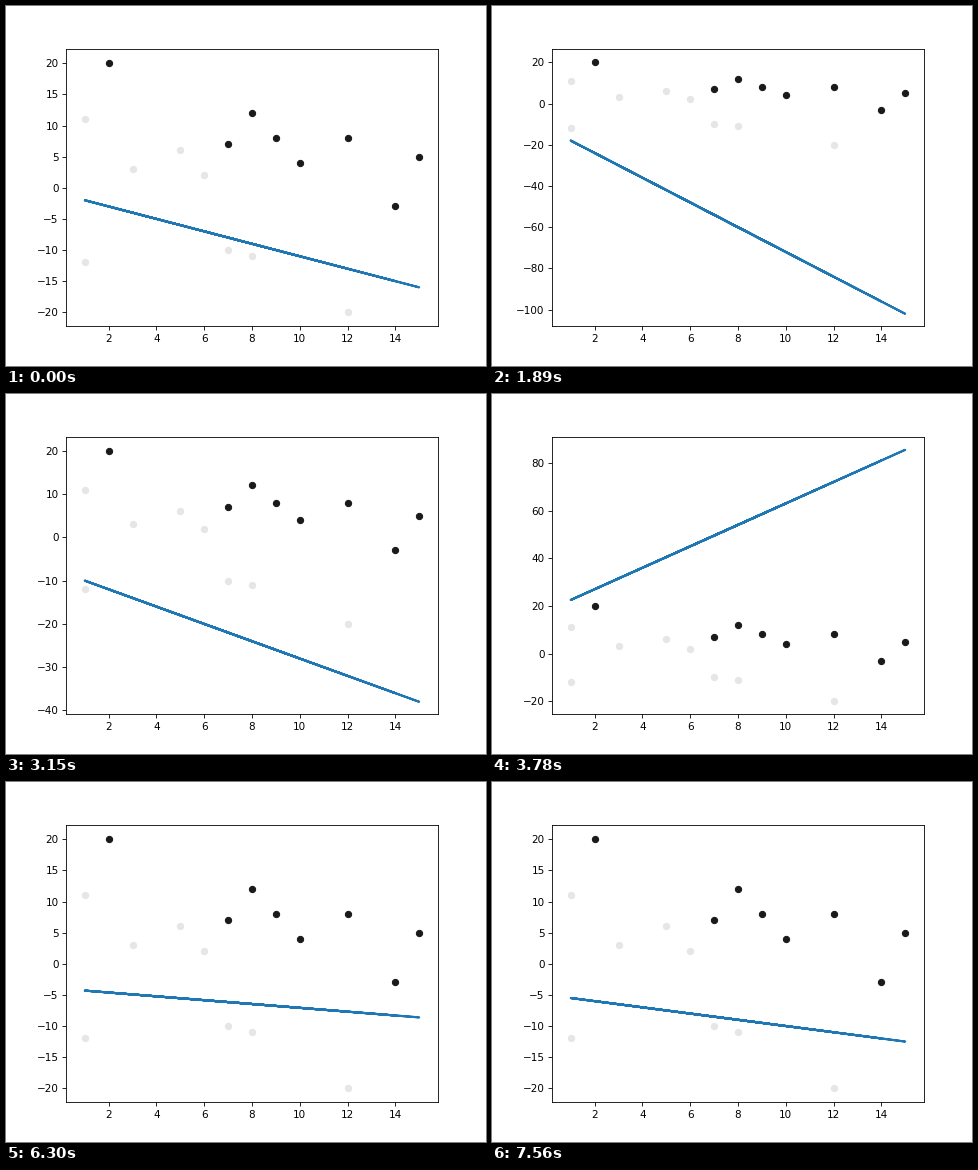
A matplotlib script for the animation above (8 s loop, 480 px wide and 360 px high).

```python
import matplotlib.pyplot as plt
import numpy as np
from matplotlib.animation import FuncAnimation

LOOP, INTERVAL, STEP = 8000, 40, 630
LAST_STEP = LOOP // STEP

LIGHT = np.array([(3, 3), (1, 11), (12, -20), (5, 6), (1, -12), (8, -11), (6, 2), (7, -10)])
DARK = np.array([(8, 12), (15, 5), (2, 20), (14, -3), (9, 8), (12, 8), (10, 4), (7, 7)])

# Where the boundary crosses the two axes (with opposite sign) at key steps
KEY_STEPS = [0, 3, 5, 6, 8, 10, 12]
X_CROSS = np.array([1, 2, 4, 4, 8, 13, 10])
Y_CROSS = np.array([1, 12, 8, -18, 3, 4, 5])

# Extra room around the markers, in data units
PAD_X, PAD_Y = 0.08, 0.25
MARGIN = 0.05

plt.rcParams["font.family"] = "DejaVu Sans"
fig, ax = plt.subplots(figsize=(6.4, 4.8), dpi=75)

xs, ys = np.stack([LIGHT, DARK], axis=1).reshape(-1, 2).T
ax.scatter(*LIGHT.T, color="0.9")
ax.scatter(*DARK.T, color="0.1")
line, = ax.plot(xs, xs, color="#1f77b4", lw=2)


def with_margin(low, high):
    space = MARGIN * (high - low)
    return low - space, high + space


def boundary_at(step):
    """Heights of the line 1 + wx * x + wy * y = 0, weights moving between keys."""
    wx, wy = (np.interp(step, KEY_STEPS, 1 / cross) for cross in (X_CROSS, Y_CROSS))
    return -(1 + wx * xs) / wy


ax.set_xlim(with_margin(xs.min() - PAD_X, xs.max() + PAD_X))


def update(frame):
    # A step that begins within this tick is already shown
    elapsed = frame * INTERVAL + INTERVAL - 1
    boundary = boundary_at(min(elapsed // STEP, LAST_STEP))
    line.set_ydata(boundary)
    low = min(ys.min() - PAD_Y, boundary.min())
    high = max(ys.max() + PAD_Y, boundary.max())
    ax.set_ylim(with_margin(low, high))
    return line,


anim = FuncAnimation(fig, update, frames=LOOP // INTERVAL, interval=INTERVAL,
                     repeat=True, repeat_delay=0, blit=False)
plt.show()
```
